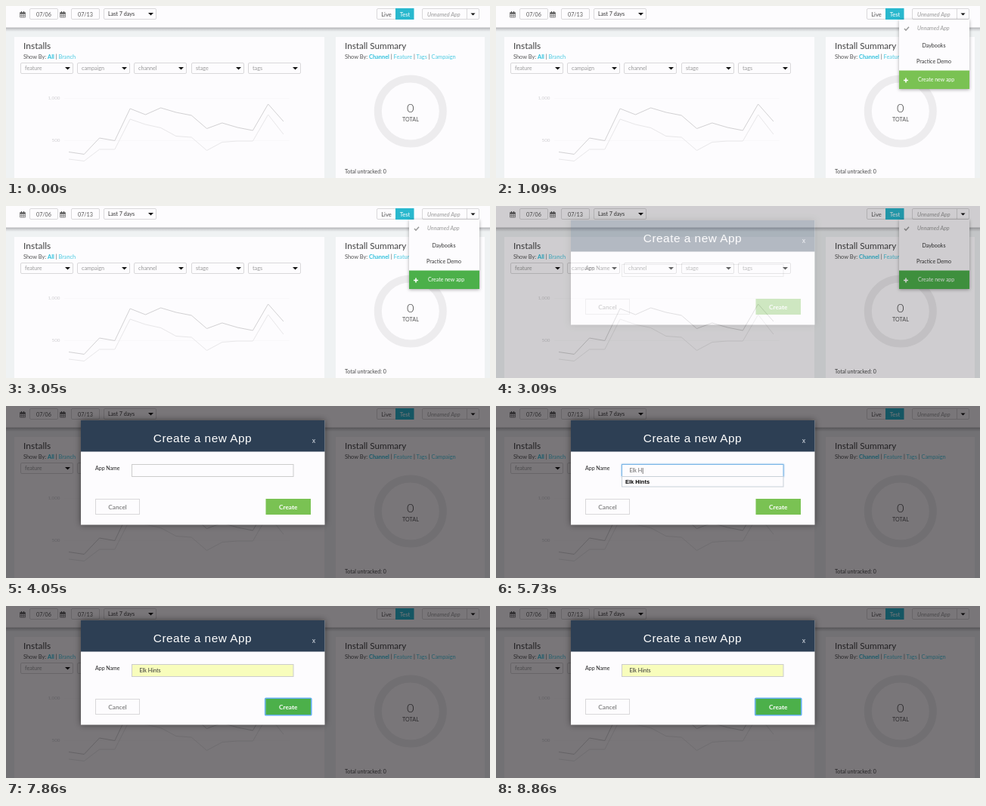
These frames come from a looping animation (640x228 px, 8900 ms). An HTML page:

```html
<!DOCTYPE html>
<html lang="en">
<head>
<meta charset="utf-8">
<title>Create a new app</title>
<style>
html, body { margin: 0; width: 100%; height: 100%; overflow: hidden; }
svg { display: block; width: 640px; height: 228px; background: #eff2f3; }
text { font-family: Lato, "Open Sans", sans-serif; white-space: pre; }
.arial { font-family: "Liberation Sans", Arial, sans-serif; }
.thin { font-weight: 300; }
.link { fill: #4ccbe2; }
.on { fill: #2cc0dc; font-weight: bold; }
.menu { filter: drop-shadow(0 1px 2px #0005); }
.dialog { filter: drop-shadow(0 0 4px #0007); }
.focus { filter: drop-shadow(0 0 1px #78b4e6); }
</style>
</head>
<body>
<svg id="stage" viewBox="0 0 640 228"></svg>
<script>
const LOOP = 8900, APP = 'Elk Hints', WHITE = '#fdfcfe';
const MENU = 1050, HOVER = 2480, DIALOG = 3050, FOCUS = 4550;
const KEYS = [4880, 5050, 5230, 5430, 5620];
const FILL = 6300, AIM = 7500, PRESS = 7840;
const LIGHT = [122, 194, 83], DARK = [76, 176, 74];

const text = (x, y, s, size = 7.4, fill = '#555', more = '') =>
  `<text x="${x}" y="${y}" font-size="${size}" fill="${fill}" ${more}>${s}</text>`;
const mid = 'text-anchor="middle"';
const rect = (x, y, w, h, fill, more = '') =>
  `<rect x="${x}" y="${y}" width="${w}" height="${h}" fill="${fill}" ${more}/>`;
const box = (x, y, w, h, more = 'rx="1.5"') =>
  rect(x + .5, y + .5, w - 1, h - 1, WHITE, `stroke="#d9d8da" ${more}`);
const arrow = (x, y, w = 3.5) => `<path d="M${x - w} ${y}h${2 * w}l${-w} ${w}z" fill="#111"/>`;
const links = names => 'Show By: ' + names.map((n, i) =>
  `<tspan class="${i ? 'link' : 'on'}">${n}</tspan>`).join(' | ');
const group = (id, s, more = '') => `<g id="${id}" ${more}>${s}</g>`;

const calendar = x => `<path d="M${x} 8.5h7v6.500h-7zM${x} 10.500h7M${x} 12.700h7M${x + 2.3} 10v5M${x + 4.7} 10v5"
  fill="none" stroke="#666" stroke-width=".7"/><path d="M${x} 9.500h7M${x + 2} 7v2M${x + 5} 7v2" stroke="#555" stroke-width="1.2"/>`;

const select = (x, y, label, fill, tx = x + 6) =>
  box(x, y, 70, 15) + text(tx, y + 10.2, label, 7.2, fill) + arrow(x + 62.5, y + 6);

const line = (ys, color) => `<polyline fill="none" stroke="${color}" points="${
  ys.map((y, i) => `${83 + i * 20.28},${y}`).join(' ')}"/>`;

const header = rect(0, 28, 640, 6, 'url(#shade)') + rect(0, 0, 640, 28.6, WHITE) +
  calendar(18.5) + calendar(71.5) +
  box(31, 3, 38, 15) + text(50, 13.5, '07/06', 7.2, '#555', mid) +
  box(86, 3, 38, 15) + text(105, 13.5, '07/13', 7.2, '#555', mid) +
  select(129, 3, 'Last 7 days', '#333') +
  box(490, 3, 26, 15) + text(503, 13.7, 'Live', 7.6, '#555', mid) +
  rect(515, 3, 24.5, 15, '#29b8ce') + text(527.5, 13.7, 'Test', 7.6, '#fff', mid) +
  box(550, 3, 76, 15) + rect(609, 3, 1, 15, '#d9d8da') +
  text(557, 13.5, 'Unnamed App', 7.35, '#999', 'font-style="italic"') + arrow(617.5, 9.5, 3);

const filters = ['feature', 'campaign', 'channel', 'stage', 'tags'];
const installs = rect(11, 41, 410, 190, WHITE) +
  text(23, 57, 'Installs', 12, '#444') +
  text(23, 69.5, links(['All', 'Branch'])) +
  filters.map((f, i) => select(Math.round(19 + i * 75.2), 75, f, '#999')).join('') +
  rect(77, 122, 298, 1, '#f9f8fa') + rect(77, 178, 298, 1, '#f9f8fa') +
  text(71.5, 124, '1,000', 6.3, '#d0cfd2', 'text-anchor="end"') +
  text(71.5, 180, '500', 6.3, '#d0cfd2', 'text-anchor="end"') +
  line([203, 205.5, 190, 190, 150, 157, 161.5, 172.5, 174, 191.5, 180.5, 179, 179, 144, 170], '#e8e7e9') +
  line([193.5, 196.5, 175, 178.5, 136, 144, 135, 141, 145, 162.5, 155, 161, 165, 130, 153], '#d2d1d3');

const summary = rect(436, 41, 197, 190, WHITE) +
  text(448, 57, 'Install Summary', 11.7, '#444') +
  text(448, 69.5, links(['Channel', 'Feature', 'Tags', 'Campaign'])) +
  '<circle cx="534.8" cy="139.500" r="43" fill="none" stroke="#edecee" stroke-width="10"/>' +
  text(534.8, 140.5, '0', 16.5, '#444', mid + ' class="thin"') +
  text(535, 153, 'TOTAL', 7.2, '#555', mid) +
  text(448, 222, 'Total untracked: 0', 7, '#444');

const menu = rect(533, 18, 93, 92, WHITE, 'class="menu"') +
  '<path d="M540 30l2 2.200 4-4.500" fill="none" stroke="#999" stroke-width="1.5"/>' +
  text(557, 32.3, 'Unnamed App', 7.2, '#999', 'font-style="italic"') +
  text(579, 54.5, 'Daybooks', 7.1, '#333', mid) +
  text(579, 75.5, 'Practice Demo', 7.1, '#333', mid) +
  rect(533, 85.5, 93, 24.5, '#000', 'id="newApp"') +
  '<path d="M539 98.500h6M542 95.500v6" stroke="#fff" stroke-width="1.6"/>' +
  text(558, 100.3, 'Create new app', 7, '#fff');

const dialog = rect(99, 19, 322.5, 138.5, WHITE, 'class="dialog"') +
  rect(99, 19, 322.5, 41.5, '#2d3f54') +
  text(260, 47.7, 'Create a new App', 15.4, '#fff', mid + ' class="arial" letter-spacing=".5"') +
  text(407, 48.5, 'x', 8.5, '#b4bcc6', mid + ' font-weight="bold"') +
  text(118, 84.7, 'App Name', 7, '#222') +
  rect(166.5, 77.5, 213.5, 16, WHITE, 'id="field"') +
  text(176.5, 88.3, '', 7.2, '#555', 'id="typed"') +
  rect(0, 82, .7, 8, '#444', 'id="caret"') +
  group('hint', rect(166.5, 93.5, 213.5, 13.5, WHITE, 'stroke="#c8d0d8"') +
    text(171, 103, APP, 7.5, '#000', 'class="arial" font-weight="bold"')) +
  box(118, 123, 59, 21, '') + text(147.5, 136.6, 'Cancel', 8.3, '#666', mid) +
  rect(342.8, 122.3, 60.9, 22.4, 'none', 'id="ring" stroke="#62aef0" stroke-width="1.8" rx="1"') +
  rect(343.5, 123, 59.5, 21, '#000', 'id="create"') +
  text(373.2, 136.6, 'Create', 8.2, '#fff', mid + ' font-weight="bold"');

const stage = document.getElementById('stage');
stage.innerHTML = `<defs><linearGradient id="shade" x2="0" y2="1">
  <stop stop-color="#9c9ca0"/><stop offset=".35" stop-color="#c9cacd"/><stop offset="1" stop-color="#eff2f3"/>
  </linearGradient></defs>` +
  installs + summary + header + group('menu', menu) +
  group('modal', rect(0, 0, 640, 228, '#040005', 'opacity=".53"') + dialog);

const el = id => document.getElementById(id);
const set = (id, name, value) => el(id).setAttribute(name, value);
const show = (id, on) => set(id, 'visibility', on ? 'inherit' : 'hidden');
const ramp = (t, start, span) => Math.max(0, Math.min(1, (t - start) / span));
const green = k => `rgb(${LIGHT.map((c, i) => Math.round(c + (DARK[i] - c) * k))})`;

function draw(t) {
  const fade = ramp(t, DIALOG + 20, 60);
  show('menu', t >= MENU && fade < 1);
  set('newApp', 'fill', green(ramp(t, HOVER, 200)));
  show('modal', fade > 0);
  set('modal', 'opacity', fade);

  const filled = t >= FILL, focused = t >= FOCUS && t < PRESS;
  const count = KEYS.filter(k => t >= k).length;
  el('typed').textContent = filled ? APP : APP.slice(0, count);
  set('typed', 'fill', filled ? '#333' : '#666');
  set('field', 'fill', filled ? '#f8fdbc' : WHITE);
  set('field', 'stroke', focused ? '#78b4e6' : '#ccc');
  set('field', 'class', focused ? 'focus' : '');
  show('caret', focused && !filled);
  set('caret', 'x', 177 + (count ? el('typed').getComputedTextLength() : 0));
  show('hint', count && !filled);

  set('create', 'fill', green(ramp(t, AIM, 200)));
  show('ring', t >= PRESS);
}

const begin = performance.now();
function tick() {
  draw((performance.now() - begin) % LOOP);
  requestAnimationFrame(tick);
}
tick();
</script>
</body>
</html>
```
